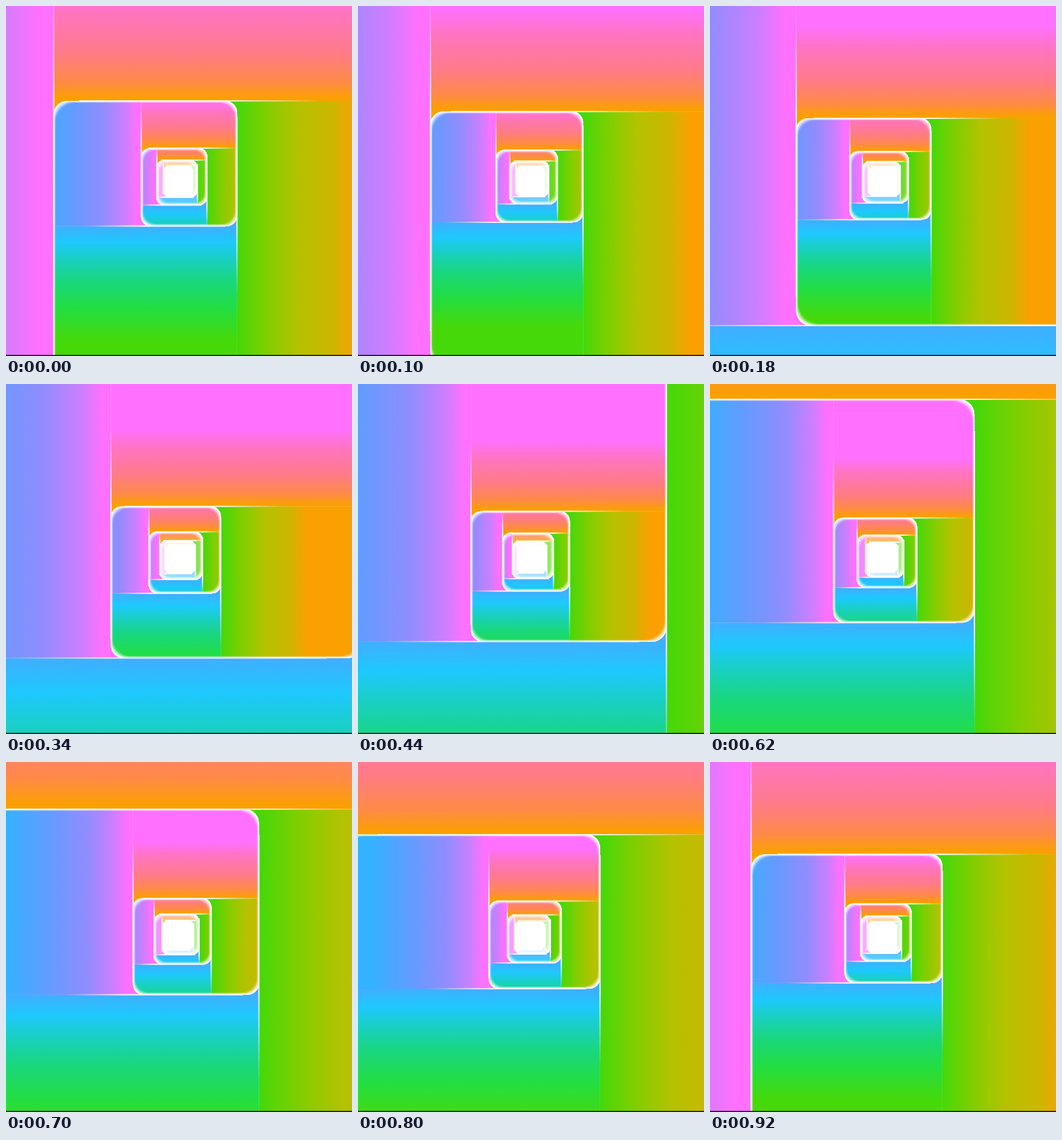
Recreate the animation shown at these times as an HTML page with a canvas. Size 500 by 505 pixels, loop 0.94 s.

```html
<!DOCTYPE html>
<html lang="en">
<head>
<meta charset="utf-8">
<title>Square spiral tunnel</title>
<style>
  html, body { margin: 0; width: 100%; height: 100%; overflow: hidden; background: #000; }
  canvas { display: block; }
</style>
</head>
<body>
<canvas id="stage" width="500" height="505"></canvas>
<script>
const ctx = document.getElementById('stage').getContext('2d');
const LOOP = 940, STEP = 20;
const CX = 250, CY = 251.5, SCALE = 77.9, PHASE = 0.43;
const FAR = 4000, SPAN = 4.2;

// Sides in cutting order: left, top, right, bottom.
const DIRS = [[-1, 0], [0, -1], [1, 0], [0, 1]];

// Colour of each side by distance from the centre, relative to its own edge.
const RAMPS = [
  [[1.12, '#ff70ff'], [1.43, '#cd7eff'], [2, '#918cff'], [2.8, '#649bff'], [3.8, '#32b2ff']],
  [[1.03, '#faa000'], [1.24, '#ff8a46'], [1.6, '#ff7b87'], [2.1, '#ff74be'], [2.5, '#ff70ff']],
  [[1, '#44d80a'], [1.5, '#80ce00'], [2.05, '#b4c200'], [2.65, '#cdb600'], [3.05, '#faa000']],
  [[1, '#41aeff'], [1.35, '#1ec8ff'], [1.75, '#19d0be'], [2.2, '#19d77d'], [2.8, '#23de41'], [3.5, '#46d90a']]
];

const sideOf = k => ((k % 4) + 4) % 4;
const clamp01 = v => Math.min(1, Math.max(0, v));

function draw(time) {
  const depth = k => PHASE + k / 4 + time / LOOP;
  const radius = k => depth(k) > 0.1 ? SCALE / depth(k) : FAR;
  const corner = k => (0.12 + 0.08 * Math.max(0, depth(k))) * Math.min(radius(k), radius(k - 1));

  function ramp(k) {
    const [dx, dy] = DIRS[sideOf(k)], r = radius(k);
    const g = ctx.createLinearGradient(
      CX + dx * r, CY + dy * r, CX + dx * r * SPAN, CY + dy * r * SPAN);
    for (const [at, colour] of RAMPS[sideOf(k)]) g.addColorStop((at - 1) / (SPAN - 1), colour);
    return g;
  }

  // Box left over after cut j; its newest side gets no inset.
  function fillBox(j, inset, bend) {
    const edge = [], round = [0, 0, 0, 0];
    for (let k = j - 3; k <= j; k++) {
      edge[sideOf(k)] = Math.max(0, radius(k) - (k === j ? 0 : inset));
      if (k > j - 3) round[sideOf(k + 3)] = bend * corner(k);
    }
    const [l, t, r, b] = edge;
    ctx.beginPath();
    ctx.roundRect(CX - l, CY - t, l + r, t + b, round);
    ctx.fill();
  }

  // Line along cut j, fading out beyond the next cut.
  function edgeLine(j) {
    const [nx, ny] = DIRS[sideOf(j)], [dx, dy] = DIRS[sideOf(j + 1)];
    const r = radius(j), near = radius(j + 1);
    const end = Math.min(near * 2.5, radius(j - 3));
    const point = s => [CX + nx * r + dx * s, CY + ny * r + dy * s];
    const g = ctx.createLinearGradient(...point(near), ...point(end));
    g.addColorStop(0, 'rgba(255,255,255,.9)');
    g.addColorStop(1, 'rgba(255,255,255,0)');
    ctx.strokeStyle = g;
    ctx.lineWidth = 1.8;
    ctx.beginPath();
    ctx.moveTo(...point(-0.8 * radius(j - 1)));
    ctx.lineTo(...point(end));
    ctx.stroke();
  }

  let k = -8;
  while (depth(k) <= 0.1) k++;
  ctx.fillStyle = ramp(k);
  ctx.fillRect(0, 0, 500, 505);

  for (; depth(k) < 4.6; k++) {
    const d = depth(k), colour = ramp(k + 1);
    ctx.fillStyle = '#fff';
    fillBox(k, 0, 1);
    ctx.fillStyle = colour;
    [0.15, 0.35, 0.65, 1].forEach((alpha, i) => {
      ctx.globalAlpha = alpha;
      fillBox(k, (i + 0.6) * (0.6 + 0.16 * d), 1 + 0.14 * i);
    });
    ctx.fillStyle = '#fff';
    ctx.globalAlpha = clamp01((depth(k + 1) - 2.9) / 1.3);
    fillBox(k, 0, 1);
    ctx.globalAlpha = 1;
    edgeLine(k);
  }

  ctx.fillStyle = '#111';
  ctx.fillRect(0, 503.5, 500, 1.5);
}

function tick() {
  draw(Math.floor(performance.now() % LOOP / STEP) * STEP);
  requestAnimationFrame(tick);
}
tick();
</script>
</body>
</html>
```
